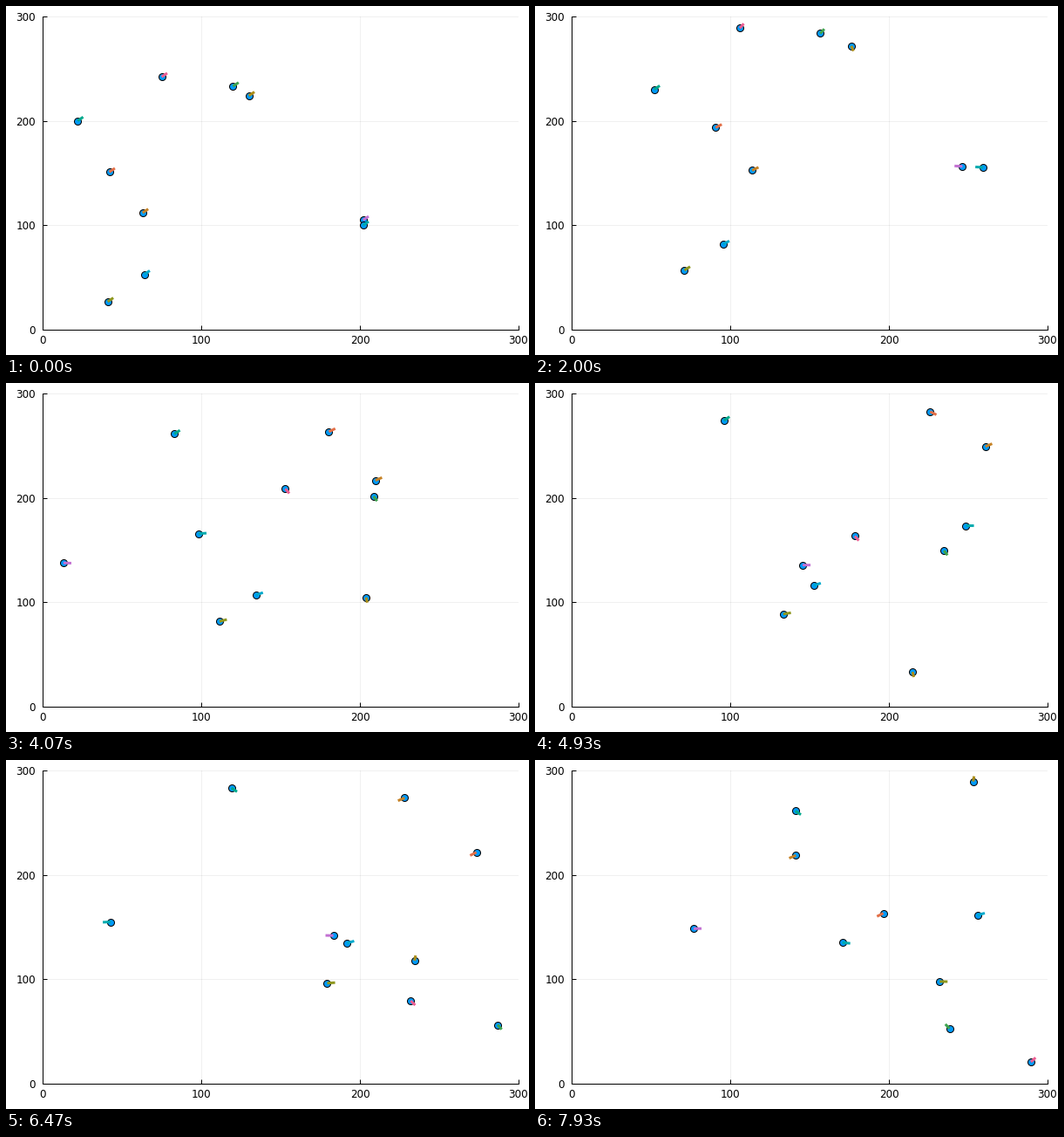
Animation of 600x400 px, one loop 8 s. Source, as a matplotlib script:

```python
import numpy as np
import matplotlib.pyplot as plt
from matplotlib.animation import FuncAnimation
from matplotlib.collections import LineCollection

W, H, DPI = 600, 400, 100
STEPS, LOOP = 120, 8000
PX = 72 / DPI  # one pixel in points
LEFT, BOTTOM, WIDTH, HEIGHT = 42.1, 371.1, 545.8, 359.4


class Bird:
    """Starts at velocity (1, 1); each push (dvx, dvy, begin, end) adds to it."""

    def __init__(self, color, x, y, *pushes, wall=10):
        self.color, self.start = color, np.array([x, y], float)
        self.pushes, self.wall = pushes, wall

    def state(self, t):
        pos, vel = self.start + t, np.ones(2)
        for gx, gy, begin, end in self.pushes:
            span = end - begin
            u = min(max((t - begin) / span, 0), 1)
            gain = np.array([gx, gy])
            vel += gain * u
            pos += gain * (span * u * u / 2 + max(t - end, 0))
        # fold the free path between the walls
        room = 300 - 2 * self.wall
        u = (pos - self.wall) % (2 * room)
        back = u > room
        return (self.wall + np.where(back, 2 * room - u, u),
                np.where(back, -vel, vel))


birds = [
    Bird("#e36f47", 42, 151, (2.5, 1.65, 0, 60)),
    Bird("#3ea44e", 120, 233, (0, 3.05, 0, 67), (1.5, 0, 0, 101)),
    Bird("#c371d2", 202, 105, (4.35, 1.2, 0, 13), (5.75, 0, 22, 76),
         (0, -3, 22, 36), (0, 1.1, 50, 80), wall=8),
    Bird("#ac8e18", 130, 224, (0.65, 0, 0, 6), (0, 4.48, 0, 37),
         (-0.8, 0, 24, 36), (0, 2.8, 88, 110)),
    Bird("#00aaae", 202, 100, (3.5, 1.2, 0, 12), (6.8, -2.8, 25, 35),
         (0, 1.5, 42, 46), (1.5, -1.8, 66, 80), (-7, 0, 104, 110), wall=8),
    Bird("#ed5e93", 75, 242, (0, 2.65, 0, 72), (1.62, 0, 20, 100)),
    Bird("#c68225", 63, 112, (2.95, 1.5, 0, 64)),
    Bird("#00a98d", 22, 200),
    Bird("#8e971e", 41, 27, (1.6, -1.07, 28, 120)),
    Bird("#00a9cc", 64, 53, (0.4, -0.3, 10, 65), (1.75, 0.6, 82, 110)),
]

plt.rcParams["font.family"] = "DejaVu Sans"
fig = plt.figure(figsize=(W / DPI, H / DPI), dpi=DPI, facecolor="white")
ax = fig.add_axes([LEFT / W, 1 - BOTTOM / H, WIDTH / W, HEIGHT / H])
ax.set(xlim=(0, 300), ylim=(0, 300),
       xticks=range(0, 301, 100), yticks=range(0, 301, 100))
ax.set_axisbelow(True)
ax.grid(color="black", alpha=0.06, linewidth=PX)
ax.tick_params(direction="in", length=5 * PX, width=PX, pad=6 * PX,
               labelsize=12 * PX)
ax.tick_params(axis="y", pad=8 * PX)
for side in ("top", "right"):
    ax.spines[side].set_visible(False)
for side in ("left", "bottom"):
    ax.spines[side].set_linewidth(PX)

balls, = ax.plot([], [], "o", color="#009afa", markeredgecolor="black",
                 markersize=8 * PX, markeredgewidth=PX, clip_on=False, zorder=3)
marks = LineCollection([], colors=[b.color for b in birds],
                       linewidths=3 * PX, capstyle="butt", zorder=4)
marks.set_clip_on(False)
ax.add_collection(marks, autolim=False)


def draw(tick):
    step = min((tick + 1) // 2, STEPS - 1)  # two ticks per step, rounded
    states = [b.state(step) for b in birds]
    balls.set_data(*np.transpose([p for p, _ in states]))
    marks.set_segments([(p, p + 5 * v / np.hypot(*v)) for p, v in states])
    return balls, marks


anim = FuncAnimation(fig, draw, frames=2 * STEPS, interval=LOOP / (2 * STEPS),
                     init_func=lambda: draw(0), repeat=True, repeat_delay=0)
plt.show()
```
